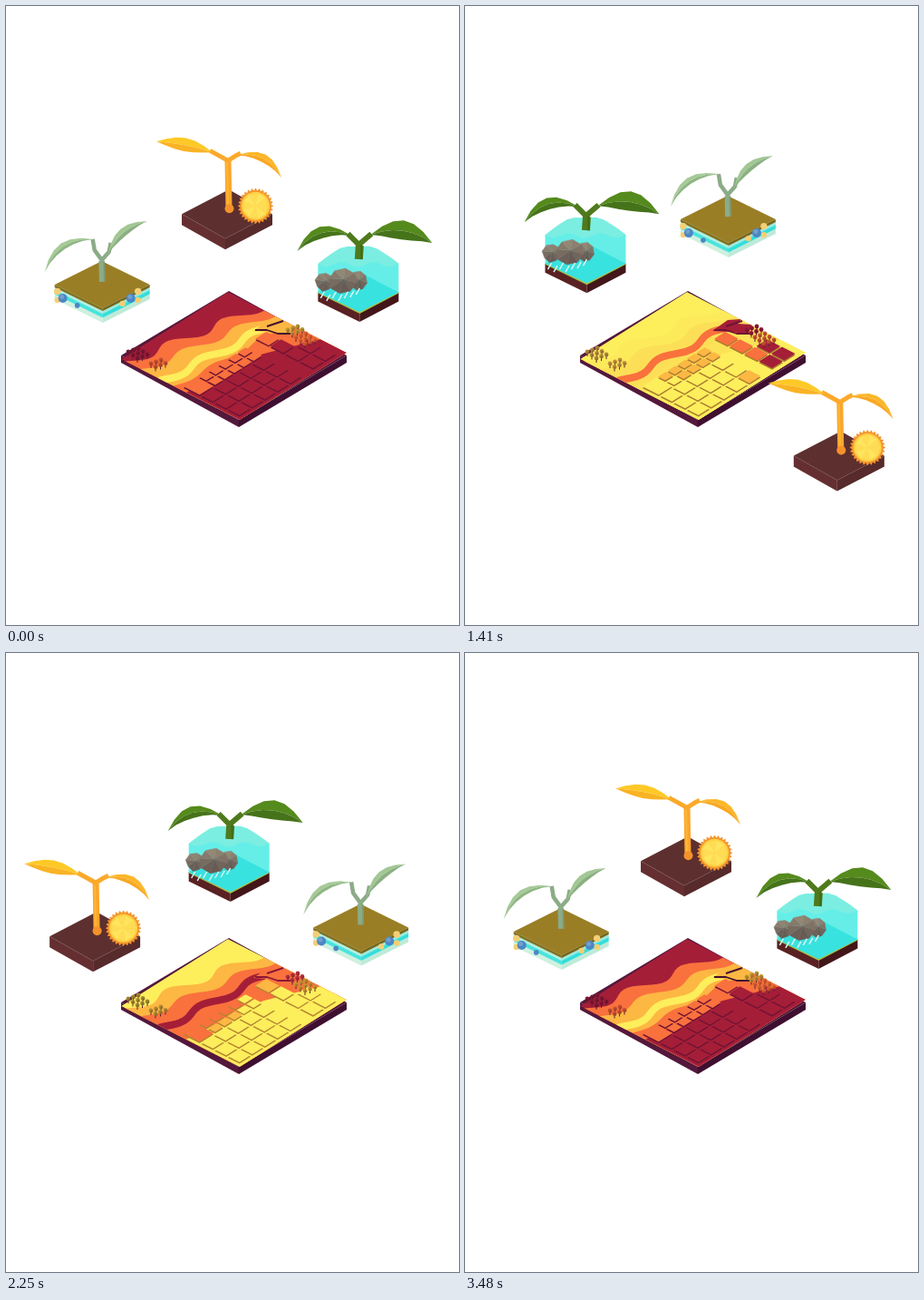
An HTML page with a canvas for the animation above (3.78 s loop, 500x682 px).

```html
<!DOCTYPE html>
<html lang="en">
<head>
<meta charset="utf-8">
<title>Growing fields</title>
<style>
html, body { margin: 0; width: 100%; height: 100%; overflow: hidden; background: #fff; }
canvas { display: block; }
</style>
</head>
<body>
<canvas id="stage" width="500" height="682"></canvas>
<script>
const ctx = document.getElementById('stage').getContext('2d');
const LOOP = 3780, TURN = 1230, STEP = 30;
const { sin, cos, PI } = Math;

// Palette
const D = '#a51e38', O = '#f9713d', A = '#fdb743', Y = '#fdee5c';

const clamp = x => Math.max(0, Math.min(1, x));
const range = (n, f) => Array.from({ length: n }, (_, i) => f(i));
const hex = c => [1, 3, 5].map(i => parseInt(c.substr(i, 2), 16));
function mix(a, b, f) {
  const p = hex(a), q = hex(b);
  return `rgb(${p.map((v, i) => Math.round(v + (q[i] - v) * f))})`;
}
const noise = n => {
  const v = sin(n * 127.1) * 43758.5;
  return v - Math.floor(v);
};

// Shapes take lists of [x, y]
function trace(pts) {
  ctx.beginPath();
  pts.forEach(p => ctx.lineTo(...p));
}
function poly(color, pts) {
  trace(pts);
  ctx.fillStyle = color;
  ctx.fill();
}
function line(color, width, ...pts) {
  trace(pts);
  ctx.strokeStyle = color;
  ctx.lineWidth = width;
  ctx.stroke();
}
function ball(color, x, y, r) {
  ctx.beginPath();
  ctx.arc(x, y, r, 0, 2 * PI);
  ctx.fillStyle = color;
  ctx.fill();
}
// Isometric slab; (0, y) is the front corner of its top face
function slab(l, r, d, y, h, top, left, right) {
  const west = [-l, y - d], east = [r, y - d];
  const drop = ([x, b]) => [x, b + h];
  poly(left, [west, [0, y], [0, y + h], drop(west)]);
  poly(right, [[0, y], east, drop(east), [0, y + h]]);
  poly(top, [west, [r - l, y - 2 * d], east, [0, y]]);
}
// Two-tone faceted leaf along a bent midrib
function leaf(light, dark, [x, y], [tx, ty], bend, width) {
  const dx = tx - x, dy = ty - y, len = Math.hypot(dx, dy), s = Math.sign(dx);
  const nx = s * dy / len, ny = -s * dx / len;
  const edge = w => range(7, i => {
    const k = i / 6, off = 2 * k * (1 - k) * bend + w * sin(PI * k);
    return [x + dx * k + nx * off, y + dy * k + ny * off];
  });
  const rib = edge(0).reverse();
  poly(light, [...edge(width), ...rib]);
  poly(dark, [...edge(-width * 0.85), ...rib]);
}

// ---- Field: u runs to the right corner, v to the left corner ----
const iso = (u, v) => [245 + 131 * u - 118 * v, 315 + 67 * u + 74 * v];
const cell = (u, v, du, dv) => [iso(u, v), iso(u + du, v), iso(u + du, v + dv), iso(u, v + dv)];
const meander = (base, slope, swing, from = 0) => range(34, i => {
  const v = from + i * (1.02 - from) / 33;
  return iso(base - slope * v + swing * cos((v - 0.45) * 15), v);
});
const shift = (pts, y) => pts.map(p => [p[0], p[1] + y]);

function grove(color, x, y, rows) {
  for (let i = 0; i < rows * 3; i++) {
    const col = 2 - i % 3, row = Math.floor(i / 3);
    const tx = x + col * 5.5 + row * 5, ty = y - col * 2 + row * 3.5;
    line('#5b2233', 1, [tx, ty], [tx, ty + 5]);
    ball(color, tx, ty, 2.4);
    ball('rgba(50,10,30,.22)', tx + 0.7, ty + 0.8, 1.6);
  }
}

// Every colour list holds one colour per rest state
function field(tone) {
  const tile = (colors, u, v, du, dv) => {
    const pts = cell(u + 0.007, v + 0.007, du - 0.014, dv - 0.014);
    poly(tone(['#701334', '#a97a2f', '#b3852f']), shift(pts, 1));
    poly(tone(colors), shift(pts, -0.7));
  };
  const below = (curve, colors) => poly(tone(colors), [...curve, iso(1, 1), iso(1, 0)]);

  ctx.save();
  ctx.translate(257, 0);
  slab(130, 119, 71, 456, 8, '#54183c', '#54183c', '#3f0f31');
  ctx.restore();

  ctx.save();
  trace(cell(0, 0, 1, 1));
  ctx.clip();
  poly(tone([D, Y, Y]), cell(0, 0, 1, 1));
  below(meander(0.265, 0.21, 0.045), [O, '#fdea5b', A]);
  below(meander(0.37, 0.19, 0.035), [A, '#fcdf56', O]);
  below(meander(0.53, 0.08, 0.02), [O, '#fce257', O]);
  poly(tone([D, Y, Y]), [iso(0.55, 1), iso(0.62, 0.36), iso(0.78, 0), iso(1, 0), iso(1, 1)]);
  line(tone([Y, O, D]), 8, ...meander(0.465, 0.11, 0.03, 0.14));

  // Pool and side streams
  poly(tone([A, D, O]), [[273, 358], [290, 346], [305, 345], [301, 350], [317, 351], [313, 361], [290, 359]]);
  const stream = tone(['#42102f', '#701334', '#8b1735']);
  line(stream, 1.8, [275, 357], [288, 357], [300, 361], [314, 361]);
  line(stream, 2, [288, 353], [297, 350], [306, 347]);

  // Plots beside the right grove
  for (let i = 0; i < 4; i++) {
    for (let j = i < 2 ? 1 : 0; j < 2; j++) {
      tile([i ? D : O, i - j > 1 ? D : O, i ? Y : A], 0.47 + i * 0.125, 0.05 + j * 0.115, 0.125, 0.115);
    }
  }
  // Narrow plots along the river, then the large ones
  for (let i = 0; i < 5; i++) {
    const v = 0.38 + i * 0.09;
    tile([O, A, i ? O : Y], 0.49, v, 0.075, 0.09);
    tile([O, i < 4 ? A : Y, i < 2 ? Y : A], 0.565, v, 0.075, 0.09);
    for (let j = 0; j < 3; j++) {
      tile([D, j === 2 && !i ? A : Y, Y], 0.64 + j * 0.112, 0.38 + i * 0.119, 0.112, 0.119);
    }
  }
  tile([O, Y, O], 0.49, 0.83, 0.15, 0.145);
  ctx.restore();

  grove(tone(['#7b1733', '#b18a3c', '#a28b2e']), 135, 381, 3);
  grove(tone(['#c4502c', '#c0903d', '#b18a2e']), 160, 394, 2);
  grove(tone(['#b59730', '#8e1735', '#b5303c']), 311, 357, 2);
  grove(tone(['#da622f', '#c6562f', '#c6932f']), 320, 365, 3);
}

// ---- Plants, drawn from the bottom corner of their block ----
function sunPlant() {
  slab(48, 52, 27, -12, 12, '#5d302f', '#652f31', '#572a2b');
  line('#fba62b', 7, [4, -44], [3, -98]);
  line('#fdb638', 2, [3, -46], [2, -96]);
  ball('#f5922b', 4.5, -45, 5);
  line('#fba92b', 5, [-17, -109], [-6, -103], [3, -98], [11, -103], [17, -106]);
  leaf('#fec927', '#f9b324', [-14, -107], [-76, -119], 4, 8);
  leaf('#fcb728', '#f9a823', [13, -104], [62, -79], 20, 5);

  const x = 33.5, y = -48;
  const ring = (n, r) => range(n, i => [x + r(i) * cos(i * 2 * PI / n), y + r(i) * sin(i * 2 * PI / n)]);
  poly('#f5952d', ring(56, i => i % 2 ? 17 : 19.8));
  ball('#fed045', x, y, 15.5);
  const rim = ring(9, () => 14);
  rim.forEach((p, i) => poly(i % 2 ? '#ffe55e' : '#fedd54', [[x, y], p, rim[(i + 1) % 9]]));
}

function rock(x, y, rx, ry) {
  const rim = range(8, i => {
    const a = i * PI / 4 + 0.2, r = 0.92 + 0.16 * noise(i + x);
    return [x + rx * r * cos(a), y + ry * r * sin(a)];
  });
  rim.forEach((p, i) => {
    const lit = 0.5 - 0.4 * sin(i * PI / 4 + 0.6) + 0.1 * noise(i + y);
    const color = mix('#62544f', '#948775', lit);
    const facet = [[x + 1, y - ry * 0.15], p, rim[(i + 1) % 8]];
    poly(color, facet);
    line(color, 0.5, ...facet);
  });
}

function waterPlant() {
  const l = 46, r = 43, d = 22.5;
  slab(l, r, d, -10, 10, '#32dfdf', '#5a2123', '#431619');
  line('#a9bf45', 1.8, [-l, -10 - d], [0, -10], [r, -10 - d]);

  const wave = (rise, chop) => range(12, i => {
    const k = i / 11;
    return [-l + (l + r) * k, -64 - rise * sin(PI * k) ** 0.8 + chop * sin(k * 16)];
  });
  const crest = wave(20, 1);
  poly('rgba(75,236,228,.85)', [...crest, [r, -10 - d], [0, -11], [-l, -10 - d]]);
  poly('rgba(50,224,222,.7)', [[0, -11], [r, -10 - d], [0, -55], [-l, -10 - d]]);
  poly('rgba(150,238,215,.45)', [...crest, ...wave(-1, 3).reverse()]);

  line('#4f7a1c', 9, [-1, -69], [0, -84]);
  line('#4f7a1c', 6, [-13, -97], [-1, -85], [13, -97]);
  line('#3f6916', 2, [2, -85], [2, -69]);
  leaf('#558a1c', '#45731a', [-9, -95], [-69, -78], 24, 7);
  leaf('#558a1c', '#45731a', [12, -96], [80, -87], 18, 11.5);

  rock(-39, -44, 10, 10);
  rock(-1, -45, 9, 11);
  rock(-19, -45, 16, 14);
  for (let i = 0; i < 7; i++) {
    const x = -39 + i * 6.5, y = -33 + (i % 2) * 3 - (i > 4 ? 4 : 0);
    line('#d9f8f5', 1.5, [x, y], [x - 4, y + 7]);
  }
}

function nutrientPlant() {
  const layer = (y, h, top, left, right) => slab(53, 52, 26, y, h, top, left, right);
  layer(-5.5, 5.5, '#d0f0df', '#d0f0df', '#bfead8');
  layer(-10, 4.5, '#48e4dd', '#48e4dd', '#34dedb');
  layer(-13, 3, '#b3efe0', '#b3efe0', '#9ee9dd');
  layer(-16, 3, '#9a7e26', '#86701f', '#796419');

  const food = '#f5cf74', salt = '#4d86c4';
  [[-50, 6], [39, -8]].forEach(([x, gap]) => {
    ball(food, x, -34.5, 3.7);
    ball(food, x, -25, 3.2);
    ball(salt, x + gap, -27, 5);
    ball('#719fce', x + gap - 1, -28.5, 2.5);
  });
  ball(salt, -28, -19, 2.8);
  ball(food, 22, -21, 3.2);

  line('#8cab87', 6.5, [-0.5, -45], [-1, -68]);
  line('#8cab87', 4.5, [-11, -92], [-9, -80], [-1, -69], [7, -78], [9, -88]);
  line('#789a78', 1.5, [1.5, -67], [2, -45]);
  leaf('#a6ca97', '#8fb584', [-10, -92], [-64, -56], 24, 4);
  leaf('#a2c794', '#8bb082', [6, -76], [49, -112], 14, 5);
}

// ---- Motion: plants circle the field between three rest angles ----
const SLOTS = [214.2, 269, 324];
const plants = [
  { draw: nutrientPlant, slot: 0, lead: 0, cx: 251, cy: 447, r: 174.5 },
  { draw: sunPlant, slot: 1, lead: -1.2, cx: 249, cy: 450.5, r: 182.3 },
  { draw: waterPlant, slot: 2, lead: 0.9, cx: 248, cy: 448, r: 174 }
];

function place(p, seg, move, pulse) {
  const from = (p.slot + seg) % 3, to = (from + 1) % 3;
  const sweep = (SLOTS[to] - SLOTS[from] + 360) % 360;
  const a = (SLOTS[from] + p.lead + sweep * move) * PI / 180;
  const size = to === 1 ? pulse : 1;
  ctx.save();
  ctx.translate(p.cx + p.r * cos(a), p.cy + p.r * sin(a) - 57);
  ctx.scale(size, size);
  ctx.translate(0, 57);
  p.draw();
  ctx.restore();
}

function render(ms) {
  const time = Math.floor((ms % LOOP) / STEP) * STEP;
  const seg = Math.min(2, Math.floor(time / TURN));
  const t = time - seg * TURN;

  const move = clamp((t - 18) / 627);
  const pulse = 1 + 0.13 * sin(PI * clamp((t - 590) / 415));
  const fade = clamp((t - 600) / 250);
  const tone = c => mix(c[seg], c[(seg + 1) % 3], fade);

  ctx.fillStyle = '#fff';
  ctx.fillRect(0, 0, 500, 682);
  ctx.lineJoin = 'round';
  field(tone);
  plants.forEach(p => place(p, seg, move, pulse));
}

const start = performance.now();
function tick() {
  render(performance.now() - start);
  requestAnimationFrame(tick);
}
tick();
</script>
</body>
</html>
```
